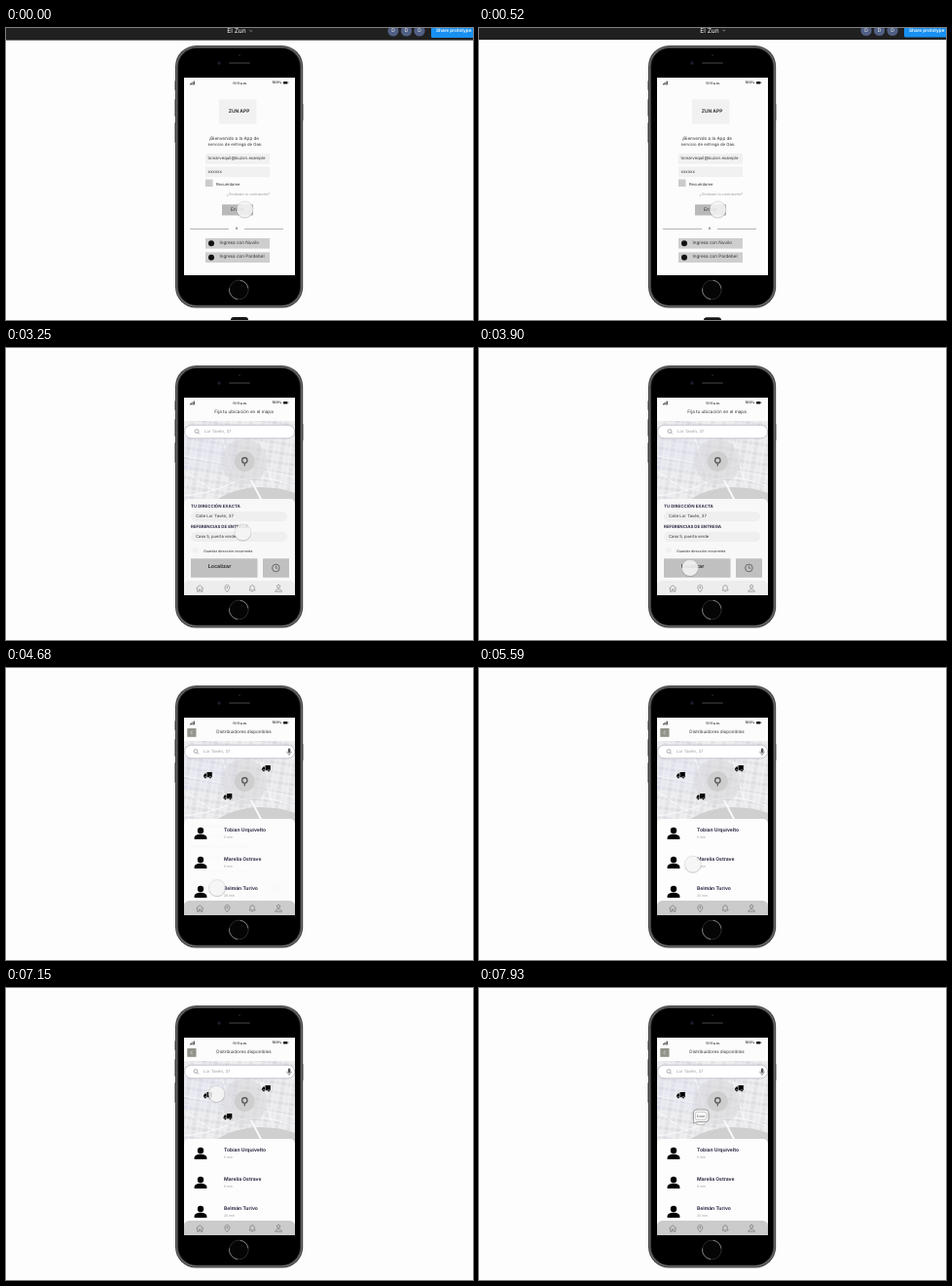
These frames come from a looping animation (480x300 px, 8 s). An HTML page:

```html
<!DOCTYPE html>
<html lang="es">
<head>
<meta charset="utf-8">
<title>Prototype</title>
<style>
html, body { margin: 0; width: 100%; height: 100%; overflow: hidden; background: #fdfdfd; }
svg { display: block; width: 100%; height: 100%; }
text { font-family: Inter, "Open Sans", sans-serif; dominant-baseline: central; text-rendering: geometricPrecision; }
</style>
</head>
<body>
<svg id="stage" viewBox="0 0 480 300"></svg>
<script>
const text = (x, y, s, size = 4.6, attrs = "") =>
  `<text x="${x}" y="${y}" font-size="${size}" fill="#333" ${attrs}>${s}</text>`;
const rect = (x, y, w, h, fill, r = 0, attrs = "") =>
  `<rect x="${x}" y="${y}" width="${w}" height="${h}" rx="${r}" fill="${fill}" ${attrs}/>`;
const circle = (x, y, r, fill, attrs = "") =>
  `<circle cx="${x}" cy="${y}" r="${r}" fill="${fill}" ${attrs}/>`;
const line = (d, color, width = 0.6, attrs = "") =>
  `<path d="${d}" fill="none" stroke="${color}" stroke-width="${width}" ${attrs}/>`;
const group = (id, body, attrs = "") => `<g id="${id}" ${attrs}>${body}</g>`;
const mid = 'text-anchor="middle" ';
const bold = 'font-weight="700" ';
const gray = 'style="fill:#999" ';
const white = 'style="fill:#fff" ';
const navy = 'style="fill:#2b2b45" ';

const trucks = [[207.5, 110], [267.5, 103], [228, 132]];

const phone =
  [[54, 10], [73, 18], [97, 21]].map(([y, h]) => rect(173.4, y, 2, h, "#555", 0.8)).join("") +
  rect(304, 78, 1.4, 17, "#555", 0.6) +
  rect(174, 18, 131.2, 269.6, "#3c3c3c", 21.5) +
  rect(175, 19, 129.2, 267.6, "#6c6c6c", 20.5) +
  rect(176.3, 20.3, 126.6, 265, "#1c1c1c", 19.4) +
  rect(177.3, 21.3, 124.6, 263, "#000", 18.6) +
  circle(240, 28, 1, "#1c1c24") + circle(219, 36, 1.8, "#1b1b2a") +
  rect(229, 35, 22, 2, "#242424", 1) +
  circle(239.3, 269, 9.8, "#050505", 'stroke="#303030" stroke-width=".9"') +
  line("M229.6 267.5a9.8 9.8 0 0 0 8.5 11.2M240.5 259.3a9.8 9.8 0 0 1 8.4 8.2", "#858585", 0.9);

const status =
  [0, 1, 2, 3].map(i => rect(189 + i * 1.3, 57.2 - i * 0.9, 0.9, 1.2 + i * 0.9, "#333")).join("") +
  text(240.5, 57, "11:11 a.m.", 3.4, mid + bold) +
  text(283.4, 56.4, "100%", 3.5, bold + 'text-anchor="end"') +
  rect(285, 55, 4.4, 2.4, "#111", 0.6) + rect(289.7, 55.7, 0.6, 1, "#111");

const chrome =
  rect(0, 0, 480, 12.6, "#202020") +
  text(237, 3, "El Zun", 6.6, mid + white) +
  line("M250.4 2.3l1.3 1.3 1.3-1.3", "#ccc") +
  [398, 411.5, 425].map(x => circle(x, 3, 5.6, "#505f83") + text(x, 3, "D", 5, mid + white)).join("") +
  rect(437, -4, 50, 14, "#1890f2", 1.5) +
  text(442, 3, "Share prototype", 4.7, white + 'font-weight="600"');

const login =
  rect(183, 51, 114, 203, "#fcfcfc") +
  rect(219, 73.5, 38.5, 25, "#f1f1f1") +
  text(239.5, 86, "ZUN APP", 4.9, mid + bold) +
  text(234.5, 114.5, "¡Bienvenido a la App de", 4.6, mid) +
  text(235.5, 120.5, "servicio de entrega de Gas:", 4.3, mid) +
  rect(205, 129, 66, 10.8, "#f1f1f1") + text(207.5, 134.4, "tomarvequil@buzon.example", 4.3) +
  rect(205, 142.4, 66, 10.8, "#f1f1f1") + text(207.5, 148, "xxxxxx", 4.4) +
  rect(205, 155.5, 7.5, 7.5, "#cbcbcb") + text(216, 160, "Recuérdame", 4.1) +
  text(271, 170.5, "¿Olvidaste tu contraseña?", 3.6, gray + 'text-anchor="end" font-style="italic"') +
  rect(222, 181.3, 32, 11.2, "#b9b9b9") + text(238, 187, "Entrar", 4.9, mid) +
  rect(189, 206, 40, 1, "#b4b4b4") + rect(245, 206, 40, 1, "#b4b4b4") + text(237, 206.3, "o", 4.4, mid) +
  ["Nuvilo", "Pardebel"].map((name, i) =>
    rect(205, 216 + i * 14.4, 66, 10.6, "#cecece") +
    circle(211, 221.3 + i * 14.4, 3, "#111") +
    text(219.5, 221.4 + i * 14.4, "Ingresa con " + name, 4.6)).join("");

const map =
  rect(183, 75, 114, 85, "#f2f2f3") + rect(183, 75, 114, 85, "url(#blocks)") +
  rect(183, 92, 56, 34, "#dcdcf3", 0, 'opacity=".22"') +
  `<path d="M183 158L212 158Q236 143 260 143T297 149V160H183Z" fill="#cfcfcf"/>` +
  line("M183 152Q212 149 234 138T297 142", "#fafafa", 1) +
  line("M183 127L216 148M222 92L236 138M260 92L274 140M183 111L297 132", "#fbfbfb", 0.8) +
  circle(245, 117, 23.5, "#d5d5d8", 'opacity=".5"') +
  circle(245.3, 116.5, 10.6, "#cecece") +
  circle(245.3, 115.4, 2.7, "#ccc", 'stroke="#5c5c5c" stroke-width="1.4"') +
  line("M245.3 118.6V121.2", "#5c5c5c", 1.3);

const header = (title, search, x, sheet) =>
  rect(183, 51, 114, 203, "#fcfcfc") + map +
  rect(183, 51, 114, 24, "#fcfcfc") +
  text(244.5, 66.2, title, 4.6, mid) +
  rect(183.6, 79.2, 113, 13.6, "#fff", 6.8, 'stroke="#b9b9c2" stroke-width=".8"') +
  circle(x - 8, 85.5, 1.9, "none", 'stroke="#777" stroke-width=".6"') +
  line(`M${x - 6.6} 86.9l1.5 1.5`, "#777") +
  text(x, 86, search, 4.3, gray) +
  rect(183, 155, 114, 110, sheet, 5) +
  line("M252 136L263 157", "#fbfbfb", 1.8);

const nav = (fill, ink) =>
  rect(183, 239, 114, 25, fill, 5.5) +
  line("M195.5 247l3.7-3.2 3.7 3.2M196.6 246.3v4h1.8v-2.4h1.7v2.4h1.8v-4" +
    "M227.3 250.8c-4-4.6-2.4-7.2 0-7.2s4 2.6 0 7.2z" +
    "M250 249h6.2l-.9-1.3v-1.8c0-2.8-4.4-2.8-4.4 0v1.8zM252.3 250.2h1.6" +
    "M276.8 250.3c0-3.2 6.6-3.2 6.6 0z", ink) +
  circle(227.3, 246, 0.8, ink) +
  circle(280.1, 245, 1.6, "none", `stroke="${ink}" stroke-width=".6"`);

const locate =
  header("Fija tu ubicación en el mapa", "Lor Tavén, 37", 204, "#f8f8f9") +
  text(190, 163.3, "TU DIRECCIÓN EXACTA", 4.4, bold + navy) +
  rect(190, 168, 99, 10.2, "#efefef", 5) + text(195, 173, "Calle Lor Tavén, 37", 4.3) +
  text(190, 184.6, "REFERENCIAS DE ENTREGA", 4.4, bold + navy) +
  rect(190, 188.8, 99, 10.2, "#efefef", 5) + text(195, 194, "Casa 5, puerta verde", 4.2) +
  rect(192, 205, 5.5, 5.5, "#f1f1f1", 1) + text(203, 208, "Guardar dirección recurrente", 3.7) +
  rect(190, 216.3, 68.5, 19.5, "#c0c0c0") + text(219.5, 225, "Localizar", 5.3, mid + bold) +
  rect(264, 216.3, 27, 19.5, "#c0c0c0") +
  circle(277.4, 226, 3.8, "none", 'stroke="#444" stroke-width=".7"') +
  line("M277.4 223.5v2.7h2", "#444") +
  nav("#ededed", "#777");

const person = y =>
  circle(200, y - 3, 3.2, "#000") +
  `<path d="M193.6 ${y + 6}v-1.4c0-5 12.8-5 12.8 0v1.4z"/>`;

const truck = ([x, y], i) => group("truck" + i,
  `<path d="M-4.3-3H1V2.2H-4.3ZM1.5-1.6H3.2L4.4.3V2.2H1.5Z"/>` +
  [-2.5, 2.6].map(w => circle(w, 2.5, 1.1, "#000", 'stroke="#eee" stroke-width=".4"')).join(""),
  `transform="translate(${x} ${y}) scale(-1 1)"`);

const list =
  header("Distribuidores disponibles", "Lor Tavén, 37", 203, "#fdfdfd") +
  rect(186.3, 62, 9.2, 8.8, "#92928a") + line("M191.6 64.6l-1.7 1.8 1.7 1.8", "#fff") +
  rect(289.8, 82.6, 2.6, 4.6, "#555", 1.3) +
  line("M288.8 85.8c0 3.2 4.6 3.2 4.6 0M291.1 88.2v1.6", "#555") +
  [["Tobian Urquivelto", "5 min"], ["Marelia Ostrave", "9 min"], ["Belmán Turivo", "20 min"]]
    .map(([name, eta], i) => person(170 + i * 30) +
      text(224, 167.3 + i * 30, name, 5, bold + navy) +
      text(224, 174.3 + i * 30, eta, 3.4, gray)).join("") +
  nav("#cbcbcb", "#666") + trucks.map(truck).join("");

const bubble =
  `<path id="outline" d="M-5-7H5Q8-7 8-4V2.5Q8 5.5 5 5.5H-4L-7.3 7.2-7.5 3V-4Q-7.5-7-5-7Z"
    fill="#f8f8f8" stroke-linejoin="round"/>` +
  rect(-5.6, -4.6, 11.4, 8, "#fafafa", 2, 'stroke="#aaa" stroke-width=".6"') +
  text(0, -0.4, "5 min", 3.3, mid + 'id="eta"');

const stage = document.getElementById("stage");
stage.innerHTML =
  `<defs>
    <pattern id="blocks" width="12" height="10" patternUnits="userSpaceOnUse" patternTransform="rotate(9)">
      <path d="M.4.4h5.2v4.2H.4zM6.4 5.4h5.2v4.2H6.4z" fill="#e6e6ea"/>
      <path d="M6.4.4h5.2v4.2H6.4z" fill="#dedee3"/>
      <path d="M.4 5.4h5.2v4.2H.4z" fill="#ececef"/>
      <path d="M3 .4v4.2M9 5.4v4.2M6.4 2.5h5.2" stroke="#d3d3d9" stroke-width=".5"/>
    </pattern>
    <clipPath id="screen"><rect x="183" y="51" width="114" height="203"/></clipPath>
  </defs>` +
  group("top", chrome) + rect(231, 297, 18, 8, "#161616", 3, 'id="toast"') + phone +
  `<g clip-path="url(#screen)">` +
  group("login", login) + group("locate", locate) + group("list", list) + status + `</g>` +
  group("cursor",
    circle(0, 0, 8.5, "#f5f5f5", 'fill-opacity=".86" stroke="#000" stroke-opacity=".12" stroke-width=".8"') +
    line("M-8 3A8.5 8.5 0 0 0 8 3", "#000", 0.8, 'opacity=".14"')) +
  group("bubble", bubble);

const STEP = 130;
// start, end, target x, target y
const moves = [
  [3250, 3900, 217, 226],
  [5460, 6110, 228, 132],
  [6500, 6890, 207, 110],
  [7150, 7540, 267, 103],
  [7670, 7930, 228, 132]
];

function cursorAt(t) {
  let x = 245.5, y = 186.5;
  for (const [start, end, tx, ty] of moves) {
    if (t < start) break;
    const p = Math.min(1, (t - start + STEP) / (end - start + STEP));
    const e = p * p * (3 - 2 * p);
    x += (tx - x) * e;
    y += (ty - y) * e;
  }
  return [x, y];
}

const set = (id, name, value) => document.getElementById(id).setAttribute(name, value);

function draw() {
  const t = Math.floor(performance.now() % 8000 / STEP) * STEP;
  const slide = t < 520 ? 0 : t < 650 ? 0.5 : t < 780 ? 7 : 20;
  set("top", "transform", `translate(0 ${-slide})`);
  set("toast", "transform", `translate(0 ${slide / 2})`);
  set("locate", "opacity", t < 650 ? 0 : t < 780 ? 0.5 : 1);
  set("list", "opacity", t < 4680 ? 0 : t < 4810 ? 0.97 : 1);

  const [x, y] = cursorAt(t);
  const pressed = t >= 4420 && t < 4680;
  set("cursor", "transform", `translate(${x} ${y}) scale(${pressed ? 0.88 : 1})`);

  const hovered = t < 5460 ? -1 : trucks.findIndex(([a, b]) => Math.hypot(a - x, b - y) < 6);
  trucks.forEach((_, i) => set("truck" + i, "opacity", i === hovered ? 0 : 1));
  set("bubble", "opacity", hovered < 0 ? 0 : 1);
  if (hovered >= 0) set("bubble", "transform", `translate(${trucks[hovered]})`);
  const settled = t >= 6500;
  set("outline", "stroke", settled ? "#8a8a8a" : "#2a2a2a");
  set("outline", "stroke-width", settled ? 0.8 : 1);
  set("eta", "opacity", settled ? 1 : 0);
  requestAnimationFrame(draw);
}
draw();
</script>
</body>
</html>
```
